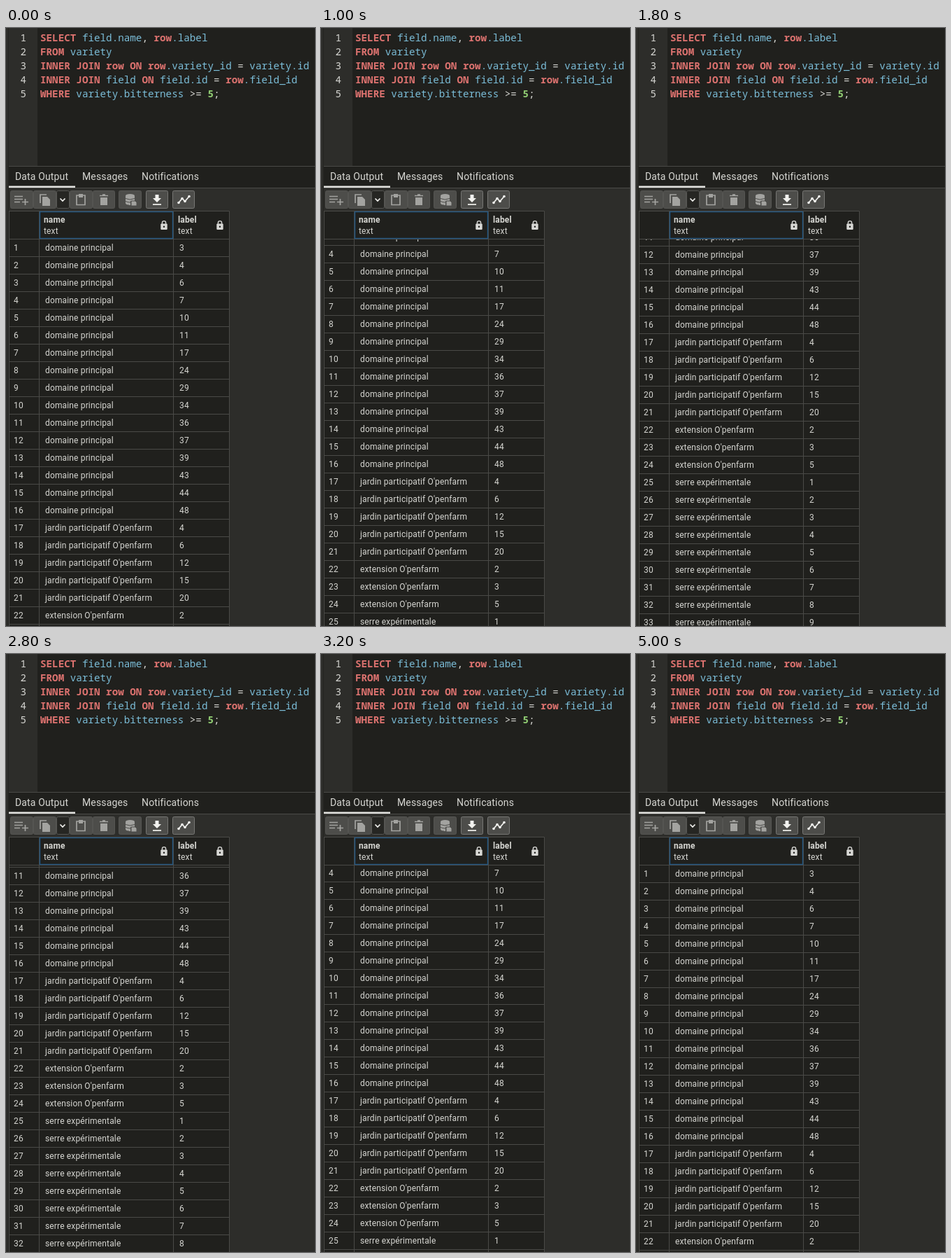
Recreate the animation shown at these times as an HTML page. Size 442x854 px, loop 5.3 s.

```html
<!DOCTYPE html>
<html lang="en">
<head>
<meta charset="utf-8">
<title>Query result</title>
<style>
  html, body { margin: 0; width: 100%; height: 100%; overflow: hidden; background: #2d2d2a; }
  svg { display: block; width: 442px; height: 854px; }
  text { fill: #d6d6d2; white-space: pre; }
  .code { font: 14.25px "Noto Sans Mono", "DejaVu Sans Mono", monospace; }
  .code .k { fill: #dc726f; font-weight: 700; }
  .code .v { fill: #7bbdd8; }
  .code .n { fill: #8fcb72; font-weight: 700; }
  .tab { font: 14px Roboto, sans-serif; letter-spacing: .15px; }
  .cell { font: 12px Roboto, sans-serif; letter-spacing: .15px; }
  .bold { font-weight: 700; }
  .line { stroke: #4a4a47; fill: none; }
  .icon { fill: none; stroke-width: 1.7; }
</style>
</head>
<body>
<svg id="stage" viewBox="0 0 442 854">
  <defs>
    <clipPath id="body"><rect x="4" y="302" width="316" height="552"/></clipPath>
    <g id="lock">
      <rect x="-4.7" y="-2.5" width="9.4" height="8.5" rx="1" fill="#d8d8d5"/>
      <path d="M-2.6-2v-1.8a2.6 2.6 0 0 1 5.2 0V-2" fill="none" stroke="#d8d8d5" stroke-width="1.4"/>
      <circle cy="1.7" r="1.2" fill="#20201d"/>
    </g>
  </defs>
  <rect width="442" height="854" fill="#2d2d2a"/>
  <rect x="45" width="397" height="197" fill="#20201d"/>
  <rect x="4" y="198" width="438" height="30" fill="#20201d"/>
  <path class="line" d="M4 197.5H442M4 228.5H442"/>
  <path d="M3.5 0V854" stroke="#242421"/>
  <rect x="4" y="225.5" width="95" height="2.5" fill="#e2e2df"/>
  <g id="editor"></g>
  <g id="tabs"></g>
  <g id="toolbar"></g>

  <g class="icon" stroke="#a3a3a0">
    <path d="M12 240.5H24M12 244.5H24M12 248.5H20M27.5 244V253M23 248.5H32"/>
    <path d="M49 250V238H58"/>
    <path d="M52 241H59L63 245V254H52Z" fill="#a3a3a0" stroke="none"/>
    <path d="M101 239H113V252.500H101Z"/>
    <path d="M104 237H110V242H104Z" fill="#a3a3a0" stroke="none"/>
    <path d="M134 239.500H146M138 238H142"/>
    <path d="M135 242H145V253H135Z" fill="#a3a3a0" stroke="none"/>
    <path d="M171 240V250C171 253 178 253 178 253V247H184V240Z" fill="#a3a3a0" stroke="none"/>
    <ellipse cx="177.500" cy="239.500" rx="6.500" ry="2.500" fill="#a3a3a0" stroke="none"/>
    <path d="M171 243.500Q177 246.500 184 243.500M171 247.500Q174 249 178 249" stroke="#4d4d4a" stroke-width="1"/>
    <path d="M179 247H185L187 249V254H179Z" fill="#a3a3a0" stroke="#4d4d4a" stroke-width="1"/>
  </g>
  <g class="icon" stroke="#f2f2ef">
    <path d="M77.500 243.500L81 247L84.500 243.500"/>
    <path d="M213.500 238H218.500V243H222L216 249L210 243H213.500Z" fill="#f2f2ef" stroke="none"/>
    <path d="M210 252H222"/>
    <path d="M247 249.500L252 243.500L256 247.500L262 240.500"/>
    <g fill="#f2f2ef" stroke="none">
      <circle cx="247" cy="249.500" r="1.800"/><circle cx="252" cy="243.500" r="1.800"/>
      <circle cx="256" cy="247.500" r="1.800"/><circle cx="262" cy="240.500" r="1.800"/>
    </g>
  </g>

  <rect x="4" y="262" width="316" height="592" fill="#20201d"/>
  <g clip-path="url(#body)"><g id="rows"></g></g>
  <path class="line" d="M4 261.500H319.500V854M4.500 262V854M47.500 262V854M239.500 262V854M4 301.500H320"/>
  <rect x="48.500" y="262.500" width="190" height="38" fill="none" stroke="#235681" stroke-width="1.400"/>
  <g id="head"></g>
  <use href="#lock" x="226" y="282"/>
  <use href="#lock" x="306" y="282"/>
</svg>
<script>
const LOOP = 5300, STEP = 100, ROW = 25, TOP = 301;
const $ = id => document.getElementById(id);
const text = (x, y, cls, content) => `<text x="${x}" y="${y}" class="${cls}">${content}</text>`;

const query = [
  "SELECT field.name, row.label",
  "FROM variety",
  "INNER JOIN row ON row.variety_id = variety.id",
  "INNER JOIN field ON field.id = row.field_id",
  "WHERE variety.bitterness >= 5;"
];
const keywords = /^(SELECT|FROM|INNER|JOIN|ON|WHERE|row)$/;

function highlight(line) {
  return line.replace(/\.?\w+|>=/g, token => {
    if (token === ">=") return "&gt;=";
    const kind = keywords.test(token) ? "k" : /^\d/.test(token) ? "n" : "v";
    return `<tspan class="${kind}">${token}</tspan>`;
  });
}

$("editor").innerHTML = query.map((line, i) => {
  const y = 19 + i * 20;
  return text(20.5, y, "code", i + 1) + text(49, y, "code", highlight(line));
}).join("");

$("tabs").innerHTML = [[13, "Data Output"], [109, "Messages"], [194, "Notifications"]]
  .map(([x, label]) => text(x, 217, "tab", label)).join("");

const button = (x, width, fill, stroke) =>
  `<rect x="${x + .5}" y="232.5" width="${width}" height="25" rx="2" fill="${fill}" stroke="${stroke}"/>`;
$("toolbar").innerHTML =
  [[6, 32], [39, 32], [91, 32], [124, 31], [161, 32]]
    .map(([x, w]) => button(x, w, "#4d4d4a", "#555552")).join("") +
  button(72, 18, "#262623", "#555552") +
  [200, 238].map(x => button(x, 31, "#4d4d4a", "#777774")).join("");

$("head").innerHTML = [[54, "name"], [246, "label"]].map(([x, label]) =>
  text(x, 278, "cell bold", label) + text(x, 294, "cell", "text")).join("");

const fields = [
  ["domaine principal", [3, 4, 6, 7, 10, 11, 17, 24, 29, 34, 36, 37, 39, 43, 44, 48]],
  ["jardin participatif O'penfarm", [4, 6, 12, 15, 20]],
  ["extension O'penfarm", [2, 3, 5]],
  ["serre expérimentale", [1, 2, 3, 4, 5, 6, 7, 8, 9]]
];
$("rows").innerHTML = fields.flatMap(([name, labels]) => labels.map(label => [name, label]))
  .map(([name, label], i) => {
    const y = TOP + i * ROW;
    return text(11, y + 17, "cell", i + 1) + text(56, y + 17, "cell", name) +
      text(248, y + 17, "cell", label) +
      `<path class="line" d="M4 ${y + .5}H320M4 ${y + ROW + .5}H320"/>`;
  }).join("");

// Scroll offsets, one per STEP; the last value of each run holds.
const scrollDown = { start: 900, offsets: [28, 66, 106, 147, 208, 265] };
const scrollUp = { start: 2800, offsets: [247, 208, 165, 120, 76, 31, 0] };

function scrollAt(time) {
  if (time < scrollDown.start) return 0;
  const { start, offsets } = time < scrollUp.start ? scrollDown : scrollUp;
  const step = Math.floor((time - start) / STEP);
  return offsets[Math.min(step, offsets.length - 1)];
}

const origin = performance.now();
function render() {
  const time = (performance.now() - origin) % LOOP;
  $("rows").setAttribute("transform", `translate(0 ${-scrollAt(time)})`);
  requestAnimationFrame(render);
}
render();
</script>
</body>
</html>
```
